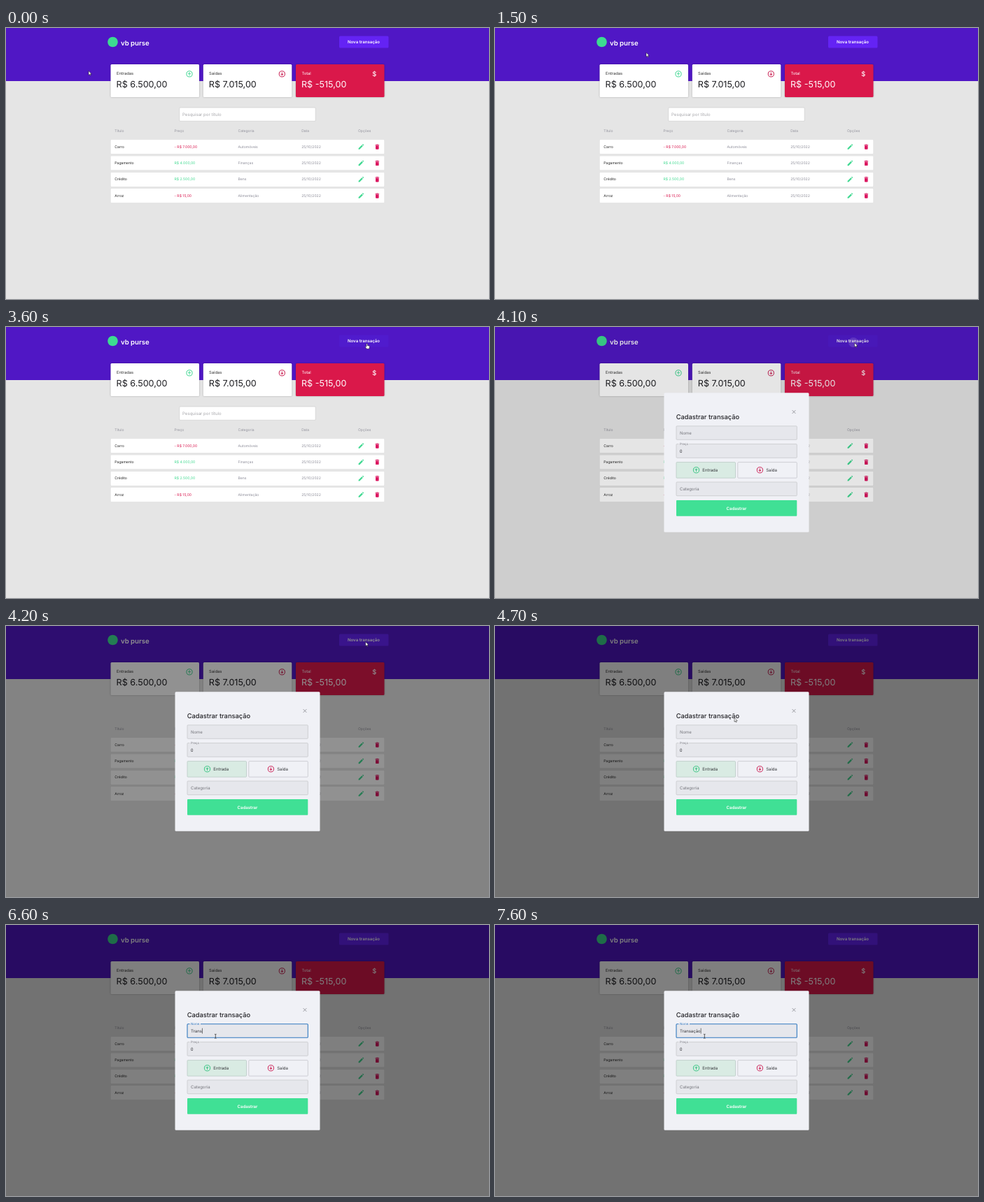
Animation of 690 by 388 pixels, one loop 8 s. Source, as an HTML page:

```html
<!DOCTYPE html>
<html lang="pt-BR">
<head>
<meta charset="utf-8">
<title>Transações</title>
<style>
  html, body { margin: 0; width: 100%; height: 100%; overflow: hidden; background: #e5e5e5; }
  svg { display: block; width: 690px; height: 388px; font-family: Inter, "Open Sans", sans-serif; text-rendering: geometricPrecision; }
  text { fill: #222; white-space: pre; }
  .brand { font-size: 9.6px; font-weight: 600; fill: #fff; }
  .label { font-size: 5.8px; fill: #333; }
  .sum { font-size: 12.6px; fill: #1c1c20; }
  .card { fill: #fff; filter: drop-shadow(0 .5px 1px #0004); }
  .total text { fill: #fff; }
  .head text { font-size: 5px; fill: #92929c; }
  .row { font-size: 5.1px; }
  .row .muted { fill: #8d8d99; }
  .row .in { fill: #3fd98f; }
  .row .out { fill: #d9174f; }
  .row rect { fill: #fff; filter: drop-shadow(0 .3px .5px #0002); }
  .hint { font-size: 6.1px; fill: #a9a9ad; }
  .btn { font-size: 6.1px; font-weight: 600; fill: #fff; text-anchor: middle; }
  .field { fill: #e6e7ec; stroke: #c3c4c8; stroke-width: .7; }
  .field-text { font-size: 6px; fill: #75767c; }
  .value { font-size: 6px; fill: #333438; }
  .small { font-size: 4.4px; fill: #75767c; }
  .heading { font-size: 9.3px; font-weight: 500; fill: #222226; }
  .line { fill: none; stroke: currentColor; stroke-width: 1; }
</style>
</head>
<body>
<svg viewBox="0 0 690 388">
  <defs>
    <g id="up">
      <circle class="line" r="4.1"/>
      <path class="line" d="M0 2.2V-1.8M-1.8 0L0-1.9L1.8 0"/>
    </g>
    <g id="down">
      <circle class="line" r="4.1"/>
      <path class="line" d="M0-2.2V1.8M-1.8 0L0 1.9L1.8 0"/>
    </g>
    <path id="pencil" fill="#42d992" d="M-3.7 3.7V2.1L1-2.6L2.6-1L-2.1 3.7zM1.6-3.2L2.4-3.8Q2.7-4 3-3.7L3.7-3Q4-2.7 3.7-2.4L3.1-1.7z"/>
    <path id="trash" fill="#db1660" d="M-2.3-1.8H2.3V2.7Q2.3 3.6 1.4 3.6H-1.4Q-2.3 3.6-2.3 2.7zM-2.8-3.2H-1.4L-.9-3.7H.9L1.4-3.2H2.8V-2.3H-2.8z"/>
  </defs>

  <rect width="690" height="388" fill="#e5e5e5"/>
  <rect width="690" height="76" fill="#5017c5"/>
  <circle cx="152.5" cy="20" r="7.3" fill="#3ddb91"/>
  <text class="brand" x="164" y="24.8">vb purse</text>

  <rect id="new" x="476" y="11.5" width="70.5" height="17" rx="1.5"/>
  <circle id="ripple" cx="512" cy="22" r="7" fill="#7b52dc" opacity=".6"/>
  <text class="btn" x="511" y="22.2">Nova transação</text>

  <g>
    <rect class="card" x="149.5" y="52" width="126.5" height="47" rx="1.5"/>
    <text class="label" x="158" y="66.6">Entradas</text>
    <text class="sum" x="157.6" y="85.1">R$ 6.500,00</text>
    <use href="#up" x="262" y="65.8" color="#3fd792"/>
  </g>
  <g>
    <rect class="card" x="281.8" y="52" width="126.5" height="47" rx="1.5"/>
    <text class="label" x="290" y="66.6">Saídas</text>
    <text class="sum" x="289.8" y="85.1">R$ 7.015,00</text>
    <use href="#down" x="394.3" y="65.8" color="#c8184d"/>
  </g>
  <g class="total">
    <rect class="card" style="fill:#da184a" x="414" y="52" width="126.5" height="47" rx="1.5"/>
    <text class="label" x="422.4" y="66.6">Total</text>
    <text class="sum" x="422" y="85.1">R$ -515,00</text>
    <text x="526.3" y="69.1" font-size="9.2" font-weight="500" text-anchor="middle">$</text>
  </g>

  <rect x="247.8" y="114" width="194.4" height="19.3" rx="1" fill="#fff" stroke="#c9c9c9" stroke-width=".6"/>
  <text class="hint" x="252" y="126.1">Pesquisar por título</text>

  <g class="head">
    <text x="155.3" y="148.6">Título</text>
    <text x="240.6" y="148.6">Preço</text>
    <text x="331.5" y="148.6">Categoria</text>
    <text x="422.2" y="148.6">Data</text>
    <text x="503" y="148.6">Opções</text>
  </g>
  <g id="rows"></g>

  <rect id="shade" width="690" height="388"/>

  <g id="modal">
    <rect x="241.5" y="94.3" width="207" height="199.5" rx="1.5" fill="#f0f1f6"/>
    <path d="M424.6 119.1l4.8 4.8m0-4.8l-4.8 4.8" stroke="#85868c" stroke-width=".8"/>
    <text class="heading" x="258.7" y="132.4">Cadastrar transação</text>

    <rect class="field" id="name" x="259" y="141.8" width="172.3" height="19.5" rx="1"/>
    <rect id="notch" x="262.5" y="141" width="15.5" height="1.7" fill="#ebecf1"/>
    <text id="nameLabel" x="264"></text>
    <text class="value" id="typed" x="264" y="154"></text>
    <rect id="caret" y="147.7" width=".6" height="7.8" fill="#222"/>

    <rect class="field" x="259" y="167.6" width="172.3" height="19.7" rx="1"/>
    <rect x="262.5" y="167" width="14.5" height="1.5" fill="#ebecf1"/>
    <text class="small" x="264" y="169.1">Preço</text>
    <text class="value" x="263.8" y="179.8">0</text>

    <rect x="259" y="193.6" width="84.5" height="22.6" rx="1" fill="#d9ebe3" stroke="#b5c6c0" stroke-width=".7"/>
    <use href="#up" x="287.5" y="204.8" color="#35c481"/>
    <text class="value" x="296.3" y="206.9">Entrada</text>
    <rect x="346.8" y="193.6" width="84.5" height="22.6" rx="1" fill="none" stroke="#c0c1c7" stroke-width=".7"/>
    <use href="#down" x="378.4" y="204.8" color="#cd1f55"/>
    <text class="value" x="387.2" y="206.9">Saída</text>

    <rect class="field" x="259" y="222" width="172.3" height="19.7" rx="1"/>
    <text class="field-text" x="264" y="234">Categoria</text>
    <rect x="259" y="248" width="172.3" height="22.7" rx="1" fill="#40e095"/>
    <text class="btn" x="345" y="261.5">Cadastrar</text>
  </g>

  <g id="pointer">
    <path id="arrow" d="M0 0V5.9L1.4 4.7L2.3 6.6L3.2 6.2L2.4 4.3H4.2z" fill="#fff" stroke="#111" stroke-width=".5"/>
    <path id="hand" d="M-.7.6Q0-.5.7.6V3L3 3.4Q3.9 3.6 3.8 4.6L3.3 7.6H-.5L-2.3 4.8Q-2.2 3.8-.7 4.6z" fill="#fff" stroke="#111" stroke-width=".5"/>
    <path id="beam" d="M-1.3-3Q0-3 0-2.4Q0-3 1.3-3M0-2.4V2.4M-1.3 3Q0 3 0 2.4Q0 3 1.3 3" fill="none" stroke="#222" stroke-width=".7"/>
  </g>
</svg>

<script>
const LOOP = 8000, STEP = 100;
const $ = id => document.getElementById(id);
const show = (id, on) => $(id).setAttribute('visibility', on ? 'visible' : 'hidden');
const set = (id, attrs) => {
  for (const key in attrs) $(id).setAttribute(key, attrs[key]);
};

const rows = [
  ['Carro', '- R$ 7.000,00', 'Automóveis'],
  ['Pagamento', 'R$ 4.000,00', 'Finanças'],
  ['Crédito', 'R$ 2.500,00', 'Bens'],
  ['Arroz', '- R$ 15,00', 'Alimentação'],
];
$('rows').innerHTML = rows.map(([title, price, category], i) => `
  <g class="row" transform="translate(0 ${160 + i * 23.35})">
    <rect x="149.5" width="391" height="20.2" rx="1"/>
    <text x="155.3" y="11.8">${title}</text>
    <text class="${price[0] === '-' ? 'out' : 'in'}" x="240.6" y="11.8">${price}</text>
    <text class="muted" x="331.5" y="11.8">${category}</text>
    <text class="muted" x="422.2" y="11.8">25/10/2022</text>
    <use href="#pencil" x="507.3" y="10.1"/>
    <use href="#trash" x="530.3" y="10.1"/>
  </g>`).join('');

// Pointer stops: time, x, y
const path = [
  [0, 118, 61.5], [400, 103, 52], [900, 117, 42], [1100, 117, 42],
  [1300, 150, 34], [1500, 216, 35.3], [1700, 299, 44], [1800, 299, 44],
  [2100, 470, 36], [2400, 600, 70], [2700, 569, 60], [3100, 538, 29],
  [3600, 515.6, 23.6], [4000, 515.6, 23.6], [4100, 513.7, 22.7],
  [4200, 513.7, 22.7], [4500, 410, 90], [4800, 308, 152], [4900, 299.3, 159.3],
];
const fade = [[4000, 0], [4100, .1], [4200, .43], [4300, .5]];
const keys = [
  [6100, 'T'], [6400, 'Tr'], [6500, 'Tran'], [6600, 'Trans'], [6700, 'Transa'],
  [7200, 'Transaç'], [7500, 'Transaçã'], [7600, 'Transação'],
];

function sample(stops, t) {
  const next = stops.findIndex(s => s[0] > t);
  if (next < 0) return stops[stops.length - 1].slice(1);
  if (next === 0) return stops[0].slice(1);
  const a = stops[next - 1], b = stops[next];
  const k = (t - a[0]) / (b[0] - a[0]);
  return a.slice(1).map((v, i) => v + (b[i + 1] - v) * k);
}

function drawName(t) {
  const focused = t >= 5100;
  const lift = Math.min(1, Math.max(0, (t - 5000) / 200));
  const text = keys.reduce((last, [at, value]) => t >= at ? value : last, '');
  $('name').style.stroke = focused ? '#3279c0' : '';
  $('name').style.strokeWidth = focused ? 1.1 : '';
  show('notch', focused);
  $('nameLabel').textContent = 'Nome';
  set('nameLabel', { y: 154 - 10.8 * lift, 'font-size': 6 - 1.6 * lift });
  $('nameLabel').style.fill = focused ? '#3279c0' : '#75767c';
  $('typed').textContent = text;
  set('caret', { x: 264 + (text ? $('typed').getComputedTextLength() + .1 : 0) });
  show('caret', focused && (t < 5600 || t >= 6100));
}

function draw(t) {
  const [x, y] = sample(path, t);
  const open = t >= 4100;
  const hover = t < 4200 && x > 476 && x < 546 && y > 11 && y < 29;
  const beam = open && x > 259 && x < 431 && y > 141 && y < 162;

  set('pointer', { transform: `translate(${x} ${y})` });
  show('arrow', !beam && (open || !hover));
  show('hand', hover && !open);
  show('beam', beam);

  set('new', { fill: hover ? '#501bcd' : '#6423f4' });
  show('ripple', t === 4100);
  set('shade', { opacity: sample(fade, t)[0] });
  $('modal').style.display = open ? '' : 'none';
  if (open) drawName(t);
}

const start = performance.now();
function tick() {
  const t = (performance.now() - start) % LOOP;
  draw(Math.floor(t / STEP) * STEP);
  requestAnimationFrame(tick);
}
tick();
</script>
</body>
</html>
```
